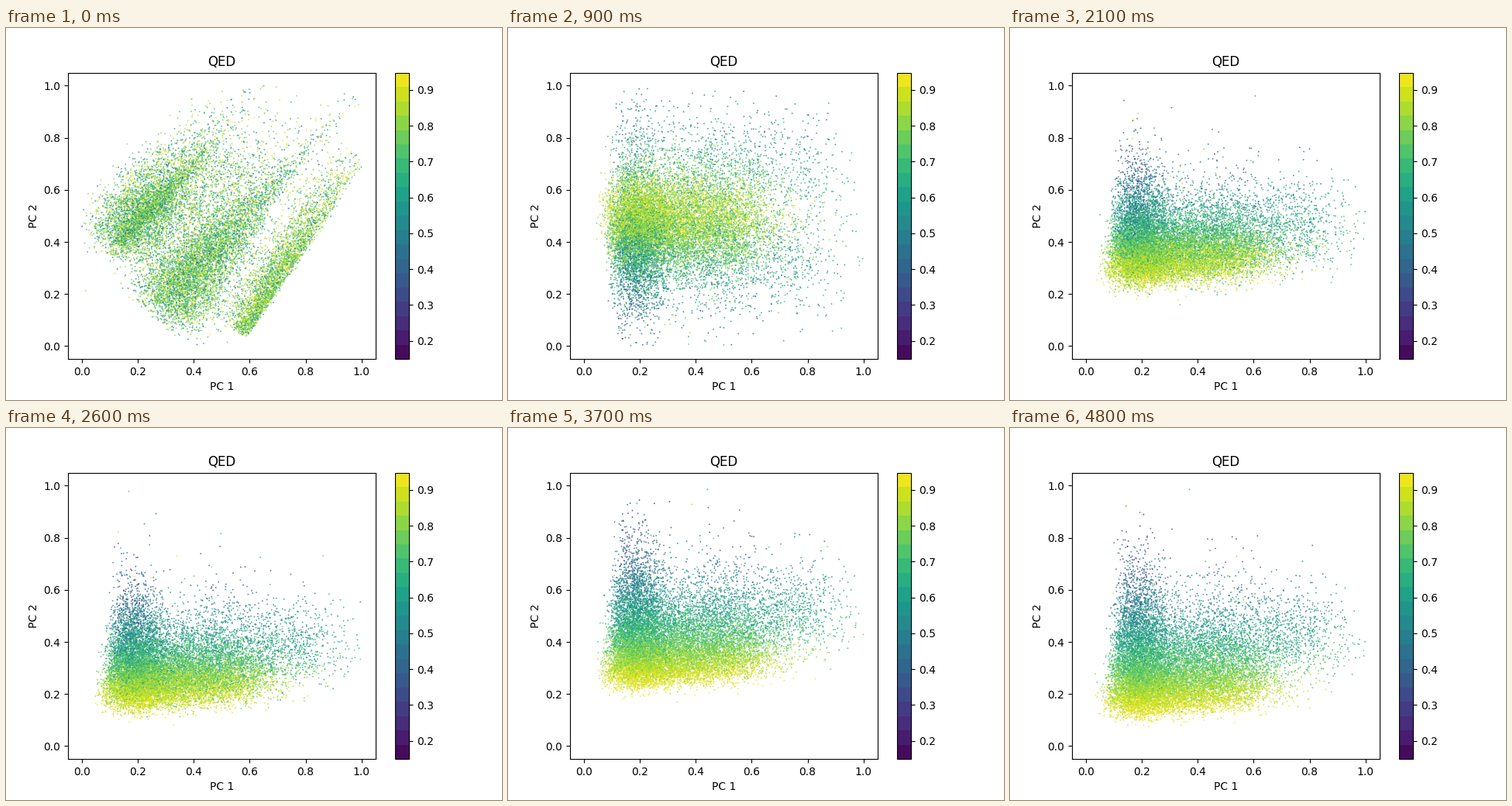
These frames come from a looping animation (640 by 480 pixels, 4900 ms). A matplotlib script:

```python
import numpy as np
import matplotlib.pyplot as plt
from matplotlib.animation import FuncAnimation
from matplotlib.colors import ListedColormap

FRAMES, STEP = 49, 100
N = 15500
QMIN, QMAX = 0.1492, 0.948
FLIP = 12          # the sign of PC 2 swaps here

rng = np.random.default_rng(7)

# Drug-likeness and the settled PC 1: a main lobe, a second lobe and a tail
kind = rng.choice(3, N, p=[0.61, 0.34, 0.05])
loss = np.choose(kind, [0.8 * rng.beta(1.4, 3.9, N),
                        0.8 * rng.beta(1.8, 5.5, N),
                        rng.normal(0.33, 0.08, N)])
qed = np.clip(QMAX - loss, QMIN, QMAX)
loss = QMAX - qed
pc1 = np.choose(kind, [0.015 + rng.gamma(5, 0.046, N) * (1 - loss) + 0.13 * loss,
                       rng.normal(0.46, 0.12, N),
                       rng.normal(0.74, 0.1, N)])
spread = rng.normal(0, 1, N)
branch = rng.random(N) < np.choose(kind, [0.15, 0.35, 0.5])
stray = rng.random(N) < 0.012


def band(center, direction, along, across):
    """Points scattered along a slanted band."""
    u = np.array(direction) / np.hypot(*direction)
    return (center[0] + along * u[0] - across * u[1],
            center[1] + along * u[1] + across * u[0])


def untrained():
    """Three slanted bands, with the good scores leaning to the right one."""
    right = rng.random(N) < np.where(qed > 0.75, 0.28, 0.16)
    group = np.where(right, 2, rng.random(N) < 0.5)
    wide = rng.normal(0, 1, N)
    core = rng.random(N) < 0.16
    t0 = rng.gamma(4, 0.075, N) - 0.27
    t1 = rng.gamma(2.6, 0.115, N) - 0.21
    t2 = 0.85 * rng.beta(1.3, 2.3, N)
    shapes = [
        band((0.235, 0.53), (0.65, 0.76), t0,
             np.where(core, 0.014 * wide - 0.012, 0.068 * wide)),
        band((0.385, 0.26), (0.65, 0.76), t1,
             wide * np.clip(0.072 - 0.1 * t1, 0.022, 0.075)),
        band((0.585, 0.035), (0.535, 0.845), t2,
             np.abs(wide) * (0.04 + 0.05 * t2) + rng.normal(0, 0.006, N)),
    ]
    x = np.choose(group, [s[0] for s in shapes])
    y = np.choose(group, [s[1] for s in shapes])
    # a thin haze fills the gaps between the bands
    haze = rng.random(N) < 0.08
    x = np.where(haze, rng.normal(0.5, 0.12, N), x)
    y = np.where(haze, 0.55 + 0.8 * (x - 0.5) + rng.normal(0, 0.1, N), y)
    keep = (x > 0) & (x < 1) & (y > 0) & (y < 1)
    return (np.where(keep, x, rng.normal(0.38, 0.07, N)),
            np.where(keep, y, rng.normal(0.3, 0.05, N)))


start_x, start_y = untrained()

# Level of the best scores and the slope of each branch over the run
KEYS = [9, 16, 26, 32, 37, 48]
LEVEL = [0.48, 0.385, 0.175, 0.315, 0.245, 0.135]
SLOPE = [0.41, 0.48, 0.54, 0.64, 0.7, 0.74]
BRANCH = [-0.5, 0.15, 0.42, 0.52, 0.6, 0.66]
NOISE = [0.065, 0.038, 0.03, 0.024, 0.024, 0.024]


def layout(i):
    level, slope, side, noise = (np.interp(i, KEYS, v)
                                 for v in (LEVEL, SLOPE, BRANCH, NOISE))
    local = np.random.default_rng(100 + i)
    x = pc1 + local.normal(0, 0.01, N)
    gain = np.where(branch, side, slope)
    y = level + gain * loss * (1 + 0.3 * loss) + 0.06 * np.clip(x - 0.2, 0, 1)
    y += (noise + 0.1 * loss) * (0.9 * spread + 0.4 * local.normal(0, 1, N))
    y += stray * (local.exponential(0.16, N) - 0.04)
    if i < FLIP:
        y = 1 - y
    w = np.exp(-i) if i < 9 else 0
    x, y = x + w * (start_x - x), y + w * (start_y - y)
    inside = (x >= 0) & (x <= 1) & (y >= 0) & (y <= 1)
    return np.column_stack([x, y]), inside


fig, ax = plt.subplots(figsize=(6.4, 4.8), dpi=100)
cmap = ListedColormap(plt.get_cmap("viridis")((np.arange(20) + 0.5) / 20))
dots = ax.scatter(start_x, start_y, c=qed, s=1.9, linewidths=0, alpha=0.75,
                  cmap=cmap, vmin=QMIN, vmax=QMAX)
bar = plt.cm.ScalarMappable(plt.Normalize(QMIN, QMAX), cmap)
fig.colorbar(bar, ax=ax, ticks=np.arange(0.2, 0.95, 0.1))
ax.set(xlim=(-0.05, 1.05), ylim=(-0.05, 1.05),
       xlabel="PC 1", ylabel="PC 2", title="QED")


def draw(i):
    points, inside = layout(i)
    points[~inside] = np.nan
    dots.set_offsets(np.ma.masked_invalid(points))
    return (dots,)


anim = FuncAnimation(fig, draw, frames=FRAMES, interval=STEP,
                     repeat=True, repeat_delay=0)
plt.show()
```
